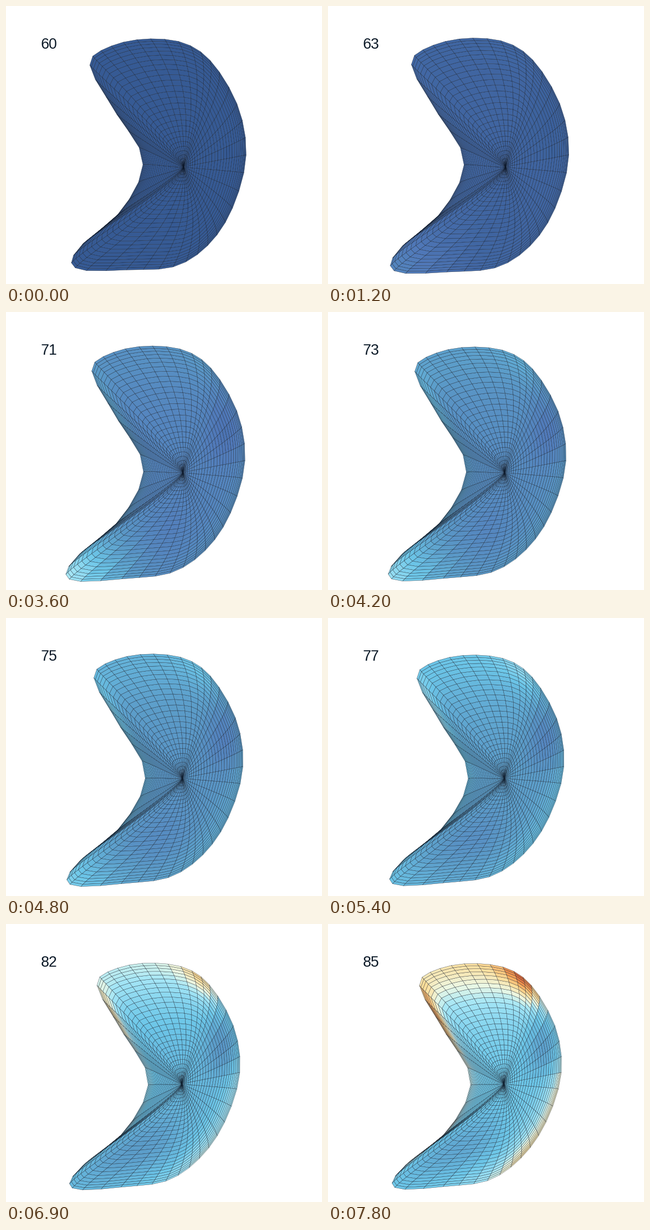
Write a matplotlib script that moves like this. It is 577x508 px and loops after 8 s.

```python
import numpy as np
import matplotlib.pyplot as plt
from matplotlib.animation import FuncAnimation
from matplotlib.collections import PolyCollection
from matplotlib.colors import LinearSegmentedColormap

W, H, DPI = 577, 508, 64
PX = 72 / DPI
RINGS, SPOKES = 28, 46
FIRST, LAST = 60, 85

# Key points of the silhouette, clockwise at equal angles from the upper tip.
KEYS = np.array([
    (153, 108), (190, 74), (258, 60), (329, 69), (381, 109), (426, 190),
    (438, 280), (412, 373), (368, 438), (308, 476), (228, 482), (132, 481),
    (129, 447), (212, 372), (250, 282), (200, 194)], float)

# Spots in mesh coordinates: angle, radius, angular width, radial width, gain.
EARLY_SPOTS = [
    (150, .90, 18, .16, .27),
    (-147, 1.0, 16, .22, .26),
    (180, 1.0, 24, .20, .12),
    (25, .70, 22, .25, -.18),
    (-100, .60, 30, .28, -.12),
]
LATE_SPOTS = [
    (100, 1.0, 58, .40, .30),
    (58, .95, 20, .22, .32),
    (-40, 1.0, 34, .30, .30),
    (0, 1.0, 18, .28, .16),
]
TIP_SPOT = (-116, 1.0, 25, .40, .42)

CMAP = LinearSegmentedColormap.from_list('heat', [
    (0, '#365a94'), (.15, '#5078b8'), (.3, '#5b9bc8'), (.45, '#6cc6e8'),
    (.6, '#a5e6f6'), (.68, '#ecf8e4'), (.78, '#fdde9b'), (.88, '#f9a658'),
    (1, '#cd482a')])


def smooth(x):
    return x * x * (3 - 2 * x)


def closed_curve(keys, n):
    """Catmull-Rom curve through the keys, sampled at n equal steps."""
    pos = np.arange(n) * len(keys) / n
    i = pos.astype(int)
    f = (pos - i)[:, None]
    a, b, c, d = (keys[(i + k) % len(keys)] for k in (-1, 0, 1, 2))
    return b + f / 2 * (c - a + f * (2 * a - 5 * b + 4 * c - d
                                     + f * (3 * (b - c) + d - a)))


def angle_gap(a, b):
    return (a - b + 180) % 360 - 180


step = 360 / SPOKES
angle = 137 - step * np.arange(SPOKES)
phi = np.radians(angle)
cos, sin = np.cos(phi), np.sin(phi)
RIM = closed_curve(KEYS, SPOKES)

# The rim slowly drifts, and on the way swells, most of all at the lower tip.
DRIFT = np.column_stack([
    -1 - 12 * cos + 9 * sin,
    3 + 8 * np.sin(phi - .4) + 6 * np.sin(2 * phi - .35)])
tip = np.exp(-(angle_gap(angle, -115) / 35) ** 2)
SWELL = np.column_stack([3 * cos - 8 * tip, -3 * sin + 6 * tip])

# The interior is an upright ellipse whose ends bend to the left.
r = np.linspace(0, 1, RINGS + 1)[:, None]
reach = .5 * r + .5 * smooth(r)
BENT = np.stack([65 * reach * cos - 80 * (reach * sin) ** 2,
                 -215 * reach * sin], axis=2)
BLEND = smooth(r)[:, :, None]

cell_angle = angle - step / 2
cell_r = (r[1:] + r[:-1]) / 2


def spot(a, radius, a_width, r_width, gain):
    return gain * np.exp(-(angle_gap(cell_angle, a) / a_width) ** 2
                         - ((cell_r - radius) / r_width) ** 2)


EARLY = sum(spot(*s) for s in EARLY_SPOTS)
LATE = sum(spot(*s) for s in LATE_SPOTS)
TIP = spot(*TIP_SPOT)


def swell_amount(t):
    return t * (1 - t) ** 1.8 / .158


def mesh(t):
    drift = smooth(t)
    rim = RIM + drift * DRIFT + swell_amount(t) * SWELL
    pole = np.array([324 - 3 * drift, 294 - 2 * drift])
    grid = pole + BENT + BLEND * (rim - pole - BENT[-1])
    turned = np.roll(grid, -1, axis=1)
    quads = np.stack([grid[:-1], grid[1:], turned[1:], turned[:-1]], axis=2)
    return quads.reshape(-1, 4, 2)


def heat(t):
    total = .46 * t + EARLY * t + LATE * t ** 2 + TIP * swell_amount(t) ** 2
    return np.clip(total, 0, 1).ravel()


fig = plt.figure(figsize=(W / DPI, H / DPI), dpi=DPI, facecolor='white')
ax = fig.add_axes([0, 0, 1, 1])
ax.set(xlim=(0, W), ylim=(H, 0))
ax.axis('off')
surface = PolyCollection([], edgecolors=(.04, .07, .12, .75),
                         linewidths=.45 * PX)
ax.add_collection(surface, autolim=False)
label = ax.text(63.5, 78, '', fontname='Liberation Sans', fontsize=27 * PX,
                color='#0a1826', va='baseline')


def update(frame):
    count = FIRST + max(0, frame // 3 - 1)
    t = (count - FIRST) / (LAST - FIRST)
    surface.set_verts(mesh(t))
    surface.set_facecolor(CMAP(heat(t)))
    label.set_text(str(count))
    return surface, label


anim = FuncAnimation(fig, update, frames=80, interval=100, repeat=True,
                     repeat_delay=0, blit=False)
plt.show()
```
